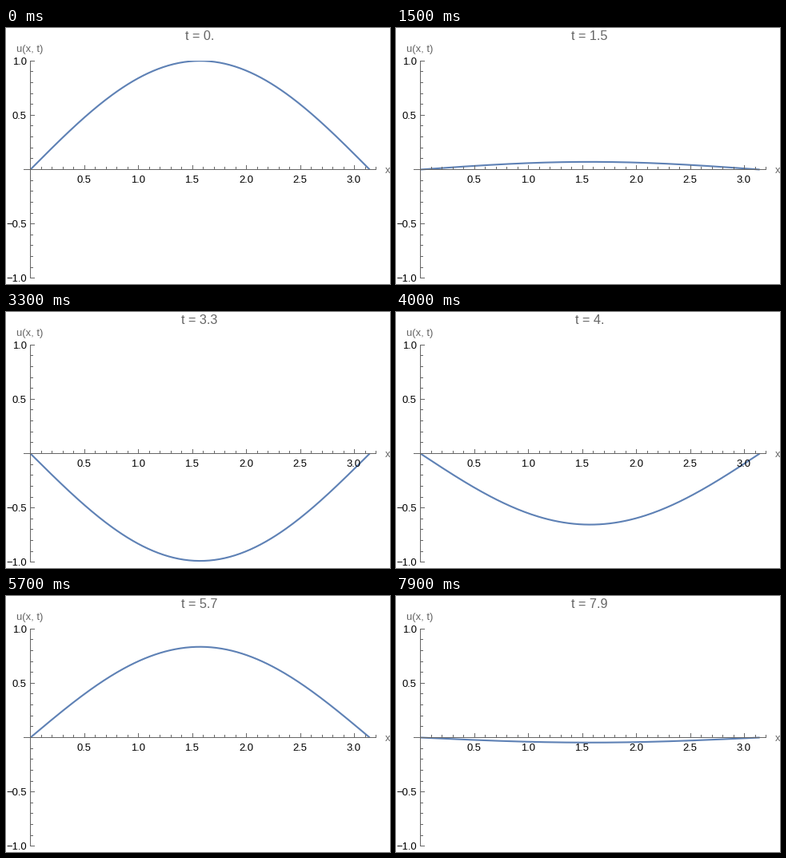
Write a matplotlib script that moves like this. It is 480 px wide and 321 px high and loops after 8000 ms.

```python
import numpy as np
import matplotlib.pyplot as plt
from matplotlib.animation import FuncAnimation
from matplotlib.patches import Rectangle

W, H, DPI = 480, 321, 64
PX = 72 / DPI                      # points per pixel
X0, Y0, SX, SY = 30.5, 177.5, 135, 136.3
LEFT, RIGHT, TOP, BOTTOM = 22, 463, 41, 314
GREY, BLUE = "#666666", "#5e81b5"
FRAMES, STEP = 80, 0.1

plt.rcParams["font.family"] = "Liberation Sans"
plt.rcParams["toolbar"] = "None"

fig = plt.figure(figsize=(W / DPI, H / DPI), dpi=DPI, facecolor="white")
ax = fig.add_axes([0, 0, 1, 1])
ax.set(xlim=(0, W), ylim=(H, 0))
ax.axis("off")


def px(x):
    return X0 + SX * x


def py(y):
    return Y0 - SY * y


def crisp(v):
    """Centre of the pixel that holds v."""
    return np.floor(v) + 0.5


def segment(xs, ys):
    ax.plot(xs, ys, color=GREY, lw=PX, solid_capstyle="butt",
            snap=False, zorder=3)


def label(x, y, s, size=13, color="black", ha="center"):
    return ax.text(x, y, s, fontsize=size * PX, color=color, ha=ha,
                   va="baseline", zorder=4)


def number(v):
    return f"{v:.1f}".replace("-", "\u2212")


# Axes with ticks every 0.1 and labels every 0.5
segment([LEFT, RIGHT], [Y0, Y0])
segment([X0, X0], [TOP, BOTTOM])
for k in range(1, 33):
    major = k % 5 == 0
    x = crisp(px(k / 10))
    segment([x, x], [Y0, Y0 - (5.5 if major else 3.5)])
    if major:
        label(px(k / 10) - 0.6, 194, number(k / 10))
for k in range(-10, 11):
    major = k % 5 == 0
    y = crisp(py(k / 10))
    segment([X0, X0 + (5.5 if major else 3.5)], [y, y])
    if major and k:
        label(25.7, y + 4.5, number(k / 10), ha="right")

label(30, 30, "u(x, t)", color=GREY)
label(477.3, 182, "x", color=GREY)
title = label(241.8, 15, "", size=16.2, color=GREY)

xs = np.linspace(0, np.pi, 200)
curve, = ax.plot([], [], color=BLUE, lw=2.1 * PX, solid_capstyle="butt",
                 solid_joinstyle="round", zorder=2)
curve.set_clip_path(Rectangle((LEFT, TOP), RIGHT - LEFT, BOTTOM - TOP,
                              transform=ax.transData))


def update(i):
    t = i * STEP
    curve.set_data(px(xs), py(np.sin(xs) * np.cos(t)))
    title.set_text(f"t = {t:.1f}" if i % 10 else f"t = {i // 10}.")
    return curve, title


anim = FuncAnimation(fig, update, frames=FRAMES, interval=100,
                     repeat=True, repeat_delay=0, blit=False)
plt.show()
```
